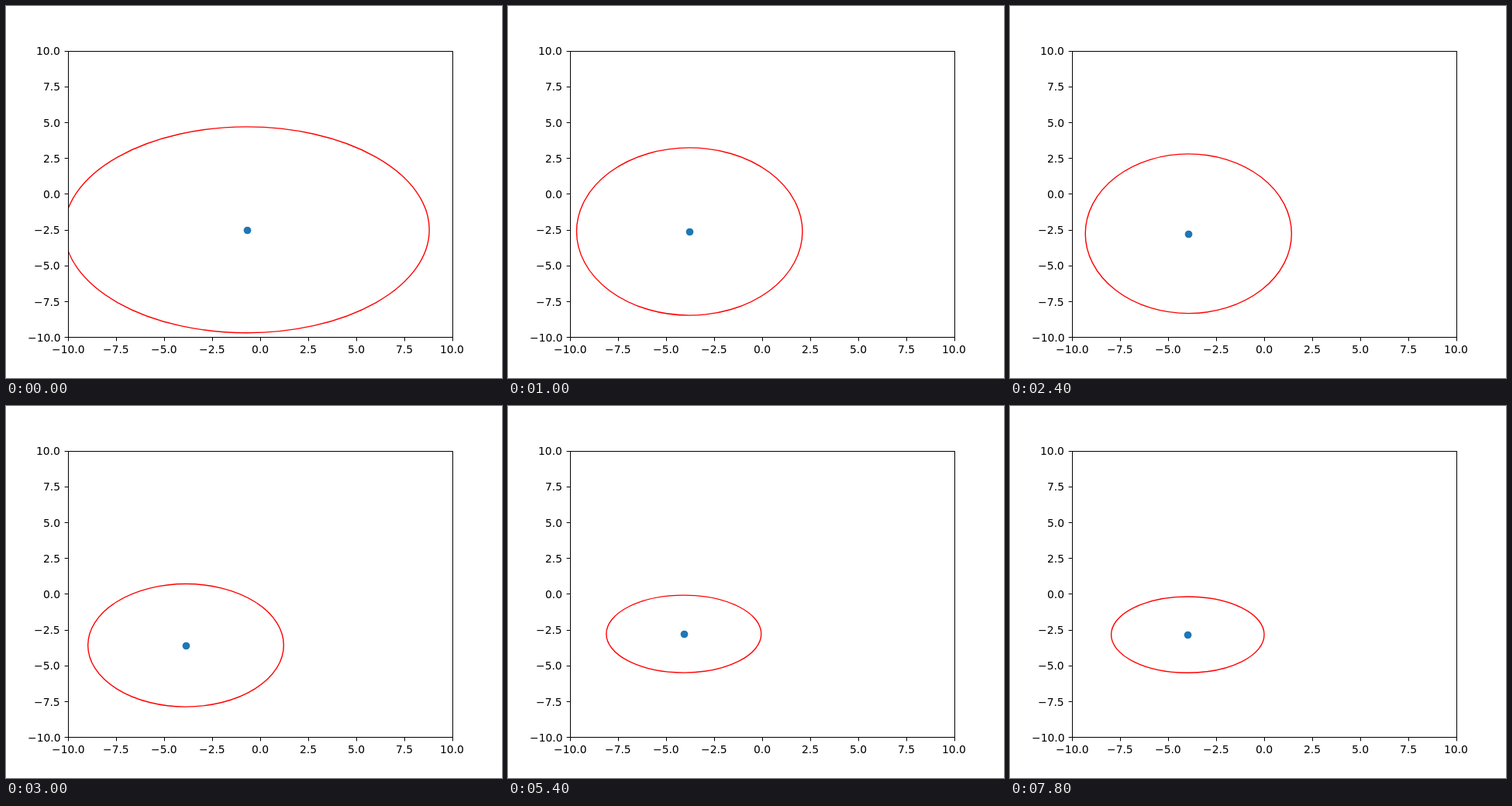
Recreate the animation shown at these times as an HTML page. Size 640 px wide and 480 px high, loop 8000 ms.

```html
<!DOCTYPE html>
<html>
<head>
<meta charset="utf-8">
<style>
html, body { margin: 0; width: 100%; height: 100%; overflow: hidden; background: #fff; }
svg { display: block; }
text { font: 13.89px "DejaVu Sans", sans-serif; }
</style>
</head>
<body>
<svg width="640" height="480" viewBox="0 0 640 480">
  <clipPath id="plot"><rect x="80" y="57.6" width="496" height="369.6"/></clipPath>
  <ellipse id="ring" clip-path="url(#plot)" fill="none" stroke="#f00" stroke-width="1.39"/>
  <circle id="dot" r="4.86" fill="#1f77b4"/>
  <g id="axes" stroke="#000" fill="none">
    <rect x="80.5" y="58.5" width="496" height="369"/>
  </g>
  <g id="labels"></g>
</svg>
<script>
const LOOP = 8000, STEP = 200;

const easeIn = u => u ** 3;
const easeOut = u => 1 - (1 - u) ** 3;

// The ring settles through these poses; ease shapes the way to the next one.
const poses = [
  { at: 0, cx: 310.7, cy: 288.8, rx: 235.5, ry: 132.9, ease: easeOut },
  { at: 1000, cx: 234.2, cy: 291, rx: 145.7, ry: 108.1, ease: easeOut },
  { at: 1800, cx: 230, cy: 291.6, rx: 134, ry: 106.3, ease: easeIn },
  { at: 3000, cx: 232, cy: 308.8, rx: 126.3, ry: 79.3, ease: easeIn },
  { at: 4400, cx: 179.9, cy: 276, rx: 113.3, ry: 65.8, ease: easeOut },
  { at: 6000, cx: 229.4, cy: 295.1, rx: 99.2, ry: 49.1, ease: easeOut },
  { at: 7800, cx: 229.3, cy: 295.1, rx: 98.7, ry: 49.1 }
];

const get = id => document.getElementById(id);

function add(parent, tag, attrs, content = "") {
  const node = document.createElementNS("http://www.w3.org/2000/svg", tag);
  for (const name in attrs) node.setAttribute(name, attrs[name]);
  node.textContent = content;
  get(parent).append(node);
  return node;
}

// Labels start on whole pixels; align is 0.5 for centred and 1 for right-aligned.
function addLabel(content, x, y, align) {
  const label = add("labels", "text", { y }, content);
  label.setAttribute("x", Math.round(x - align * label.getComputedTextLength() - .1));
}

for (let i = 0; i <= 8; i++) {
  const value = (-10 + 2.5 * i).toFixed(1).replace("-", "\u2212");
  const x = 80 + 62 * i, y = 427.2 - 46.2 * i;
  add("axes", "path", { d: `M${x + .5} 427.5v4.86M80.5 ${Math.round(y) + .5}h-4.86` });
  addLabel(value, x, 448, .5);
  addLabel(value, 70.28, Math.round(y + 5.6), 1);
}

function poseAt(time) {
  const next = Math.max(1, poses.findIndex(pose => pose.at >= time));
  const a = poses[next - 1], b = poses[next];
  const u = a.ease((time - a.at) / (b.at - a.at));
  const mix = name => a[name] + (b[name] - a[name]) * u;
  return { cx: mix("cx"), cy: mix("cy"), rx: mix("rx"), ry: mix("ry") };
}

function draw(time) {
  const pose = poseAt(Math.floor(time % LOOP / STEP) * STEP);
  for (const name in pose) get("ring").setAttribute(name, pose[name]);
  for (const name of ["cx", "cy"]) get("dot").setAttribute(name, Math.round(pose[name]) + .5);
}

const start = performance.now();
function tick() {
  draw(performance.now() - start);
  requestAnimationFrame(tick);
}
tick();
</script>
</body>
</html>
```
